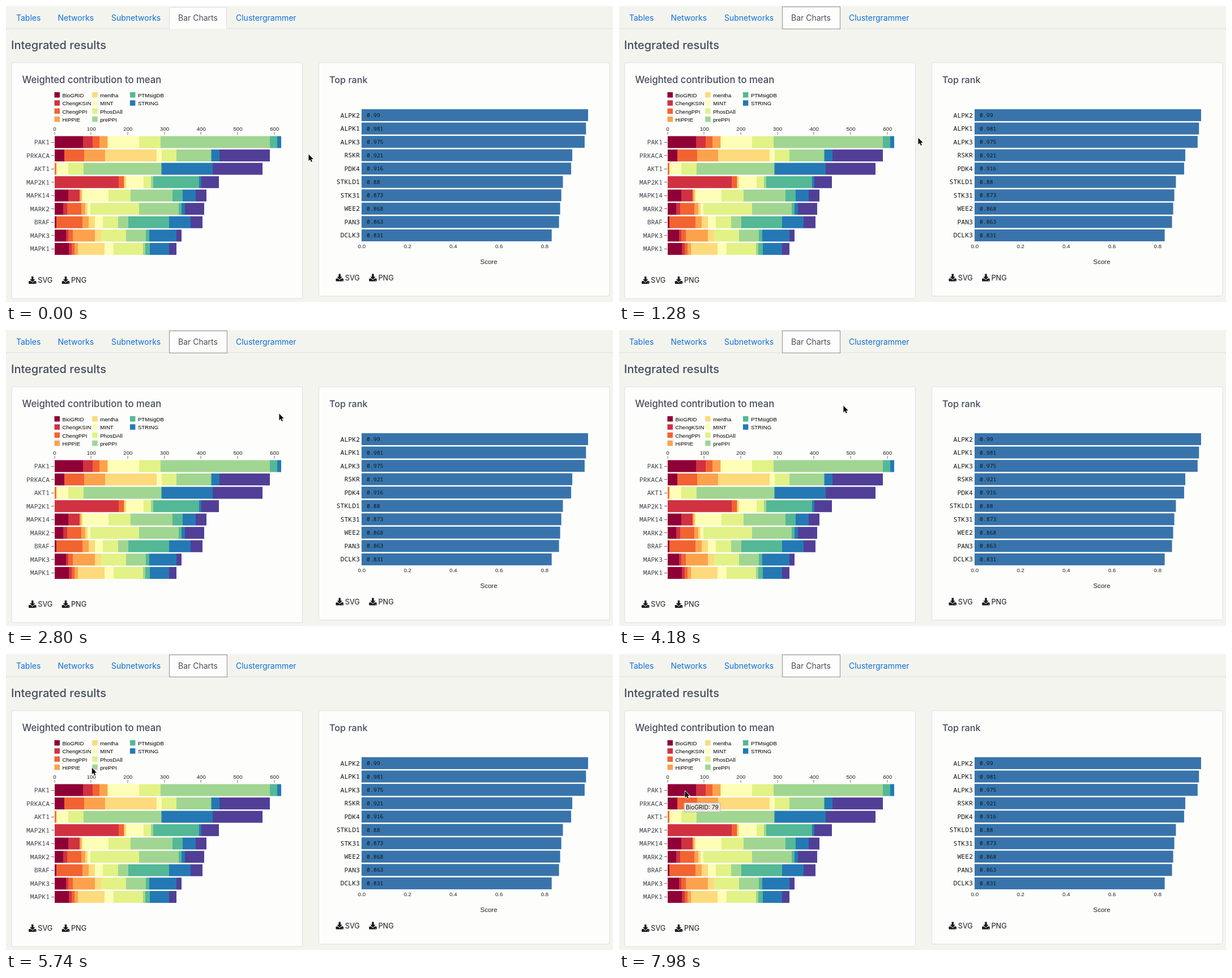
An HTML page with a canvas that plays this animation: 1072x522 px, repeating every 8000 ms.

```html
<!DOCTYPE html>
<html lang="en">
<head>
<meta charset="utf-8">
<title>Bar charts</title>
<style>
  html, body { margin: 0; width: 100%; height: 100%; overflow: hidden; background: #f4f4ef; }
  canvas { display: block; width: 1072px; height: 522px; }
</style>
</head>
<body>
<canvas id="stage" width="1072" height="522"></canvas>
<script>
const LOOP = 8000, FOCUS_AT = 600, TOOLTIP_AT = 7200;
const ctx = document.getElementById('stage').getContext('2d');
const UI = 'Inter, sans-serif', ARIAL = '"Liberation Sans", sans-serif', MONO = '"Noto Sans Mono", monospace';
const HEADING = '#444c5a', ROW_STEP = 23.55, BAR_H = 21;

const sources = [
  ['BioGRID', '#8f0036'], ['ChengKSIN', '#d03241'], ['ChengPPI', '#f26332'], ['HIPPIE', '#fca24d'],
  ['mentha', '#fdda7b'], ['MINT', '#fefeb6'], ['PhosDAll', '#e2f286'], ['prePPI', '#a0d691'],
  ['PTMsigDB', '#54b897'], ['STRING', '#2479b4'], ['', '#513f97']
];

// Right edge of each stacked segment, in source order.
const stacks = {
  PAK1: [136, 153, 165, 179, 180, 235, 273, 466, 479, 486],
  PRKACA: [103, 103, 138, 175, 266, 275, 301, 362, 363, 377, 466],
  AKT1: [86, 86, 88, 89, 90, 110, 137, 274, 275, 365, 453],
  MAP2K1: [86, 199, 208, 209, 212, 243, 256, 260, 341, 345, 376],
  MAPK14: [110, 130, 130, 133, 135, 181, 220, 294, 312, 335, 354],
  MARK2: [101, 108, 133, 140, 144, 149, 235, 305, 310, 316, 350],
  BRAF: [89, 89, 135, 146, 157, 171, 198, 216, 288, 326, 347],
  MAPK3: [106, 110, 118, 157, 168, 168, 212, 247, 253, 301, 310],
  MAPK1: [111, 116, 121, 127, 174, 190, 242, 246, 254, 288, 301]
};

const scores = {
  ALPK2: 0.99, ALPK1: 0.981, ALPK3: 0.975, RSKR: 0.921, PDK4: 0.916,
  STKLD1: 0.88, STK31: 0.873, WEE2: 0.868, PAN3: 0.863, DCLK3: 0.831
};

// Pointer path: time, x, y
const path = [
  [0, 534, 261], [1280, 528, 232], [2800, 482, 147], [4180, 396, 133],
  [5060, 218, 155], [6600, 116, 241], [LOOP, 116, 241]
];

function text(str, x, y, font, color, align = 'left') {
  ctx.font = font;
  ctx.fillStyle = color;
  ctx.textAlign = align;
  ctx.fillText(str, x, y);
}

function rect(x, y, w, h, color) {
  ctx.fillStyle = color;
  ctx.fillRect(x, y, w, h);
}

function polygon(points, color) {
  ctx.beginPath();
  points.forEach(([x, y]) => ctx.lineTo(x, y));
  ctx.closePath();
  ctx.fillStyle = color;
  ctx.fill();
}

function panel(x, y, w, h, r, fill, stroke) {
  ctx.beginPath();
  ctx.roundRect(x + 0.5, y + 0.5, w, h, r);
  ctx.fillStyle = fill;
  ctx.fill();
  ctx.strokeStyle = stroke;
  ctx.lineWidth = 1;
  ctx.stroke();
}

function drawTabs(focused) {
  rect(0, 39.5, 1072, 1, '#dddee1');
  if (focused) {
    panel(288, 1, 102, 39, 0, '#fdfdfc', '#d0d0d2');
    ctx.setLineDash([1, 1]);
    ctx.strokeStyle = '#444a52';
    ctx.strokeRect(288.5, 1.5, 102, 39);
    ctx.setLineDash([]);
  } else {
    panel(288, 2, 101, 40, [3, 3, 0, 0], '#fdfdfc', '#dcdee2');
    rect(288, 40, 103, 4, '#f4f4ef');
  }
  const tabs = { Tables: 18, Networks: 91.5, Subnetworks: 186, 'Bar Charts': 304, Clustergrammer: 406 };
  for (const [name, x] of Object.entries(tabs)) {
    text(name, x, 26.3, `14px ${UI}`, name === 'Bar Charts' ? '#495057' : '#0e6fd8');
  }
}

function drawButton(label, x, y) {
  const ink = '#17191c';
  ctx.beginPath();
  ctx.roundRect(x, y + 8, 13.5, 5, 1);
  ctx.fillStyle = ink;
  ctx.fill();
  polygon([[x + 3, y + 7.2], [x + 6.75, y + 11], [x + 10.5, y + 7.2]], '#fdfdfc');
  rect(x + 5, y, 3.5, 6, ink);
  polygon([[x + 2, y + 5], [x + 11.5, y + 5], [x + 6.75, y + 10]], ink);
  rect(x + 10.8, y + 11, 1.2, 1, '#fdfdfc');
  text(label, x + 16.3, y + 11.4, `12.7px ${UI}`, ink);
}

function drawContribution() {
  panel(9.5, 99.5, 513.5, 416, 3, '#fdfdfc', '#dcdee2');
  text('Weighted contribution to mean', 28.5, 136, `500 16.7px ${UI}`, HEADING);

  sources.slice(0, 10).forEach(([name, color], i) => {
    const x = 85.5 + Math.floor(i / 4) * 66.7, y = 152 + (i % 4) * 14.3;
    rect(x, y, 9.5, 9.5, color);
    text(name, x + 14, y + 9, `9.65px ${ARIAL}`, '#000');
  });

  for (let n = 0; n <= 600; n += 100) {
    const x = 86 + n * 0.647;
    text(n, x, 219.5, `9.65px ${ARIAL}`, '#222', 'center');
    rect(Math.floor(x) - 0.5, 222, 1, 5, '#777');
  }

  Object.entries(stacks).forEach(([gene, edges], row) => {
    const y = 229.5 + row * ROW_STEP;
    let left = 86;
    edges.forEach((right, i) => {
      rect(left, y, right - left, BAR_H, sources[i][1]);
      left = right;
    });
    text(gene, 77, y + 14.5, `11.4px ${MONO}`, '#3c424b', 'right');
    rect(80, Math.round(y + 10), 5, 1, '#666');
  });

  drawButton('SVG', 40, 477);
  drawButton('PNG', 98.7, 477);
}

function drawRanking() {
  panel(552, 99.5, 513.5, 411.5, 3, '#fdfdfc', '#dcdee2');
  text('Top rank', 571, 136, `500 16.2px ${UI}`, HEADING);

  Object.entries(scores).forEach(([gene, score], row) => {
    const y = 182 + row * ROW_STEP;
    rect(628, y, score * 404, BAR_H, '#3874ab');
    text(gene, 625, y + 14.5, `11.5px ${MONO}`, '#111', 'right');
    text(score, 637, y + 14, `9.8px ${MONO}`, '#0b1420');
  });

  for (let i = 0; i < 5; i++) {
    text((i / 5).toFixed(1), 628.3 + i * 80.8, 427, `9.65px ${ARIAL}`, '#222', 'center');
  }
  text('Score', 852.5, 455, `11.5px ${ARIAL}`, '#222', 'center');

  drawButton('SVG', 582.5, 472.5);
  drawButton('PNG', 641.2, 472.5);
}

function slope(i, axis) {
  if (i === 0 || i >= path.length - 2) return 0;
  const a = path[i - 1], b = path[i + 1];
  return (b[axis] - a[axis]) / (b[0] - a[0]);
}

// Cubic Hermite interpolation along the pointer path.
function pointerAt(t) {
  let i = 0;
  while (i < path.length - 2 && t >= path[i + 1][0]) i++;
  const a = path[i], b = path[i + 1], span = b[0] - a[0], u = (t - a[0]) / span;
  const ease = u * u * (3 - 2 * u);
  return [1, 2].map(axis =>
    a[axis] + (b[axis] - a[axis]) * ease +
    span * (slope(i, axis) * u * (1 - u) ** 2 - slope(i + 1, axis) * u * u * (1 - u)));
}

function drawPointer(t) {
  const [x, y] = pointerAt(t);
  ctx.save();
  ctx.translate(x, y);
  ctx.lineJoin = 'round';
  polygon([[0.5, 0.5], [0.5, 12.3], [3.2, 9.8], [5.1, 14], [6.9, 13.2], [5.1, 9.1], [8.8, 9.1]], '#050505');
  ctx.strokeStyle = '#fff';
  ctx.lineWidth = 1.6;
  ctx.globalCompositeOperation = 'source-over';
  ctx.stroke();
  ctx.fill();
  ctx.restore();
}

function drawTooltip() {
  panel(114.5, 262, 64, 16, 0, '#ece8e1', '#bcb8b2');
  text('BioGRID: 79', 118, 274, `10.3px ${UI}`, '#111');
}

function draw(t) {
  rect(0, 0, 1072, 522, '#f4f4ef');
  drawTabs(t >= FOCUS_AT);
  text('Integrated results', 9, 76, `500 20px ${UI}`, HEADING);
  drawContribution();
  drawRanking();
  if (t >= TOOLTIP_AT) drawTooltip();
  drawPointer(t);
}

const start = performance.now();
function tick() {
  draw((performance.now() - start) % LOOP);
  requestAnimationFrame(tick);
}
tick();
</script>
</body>
</html>
```
